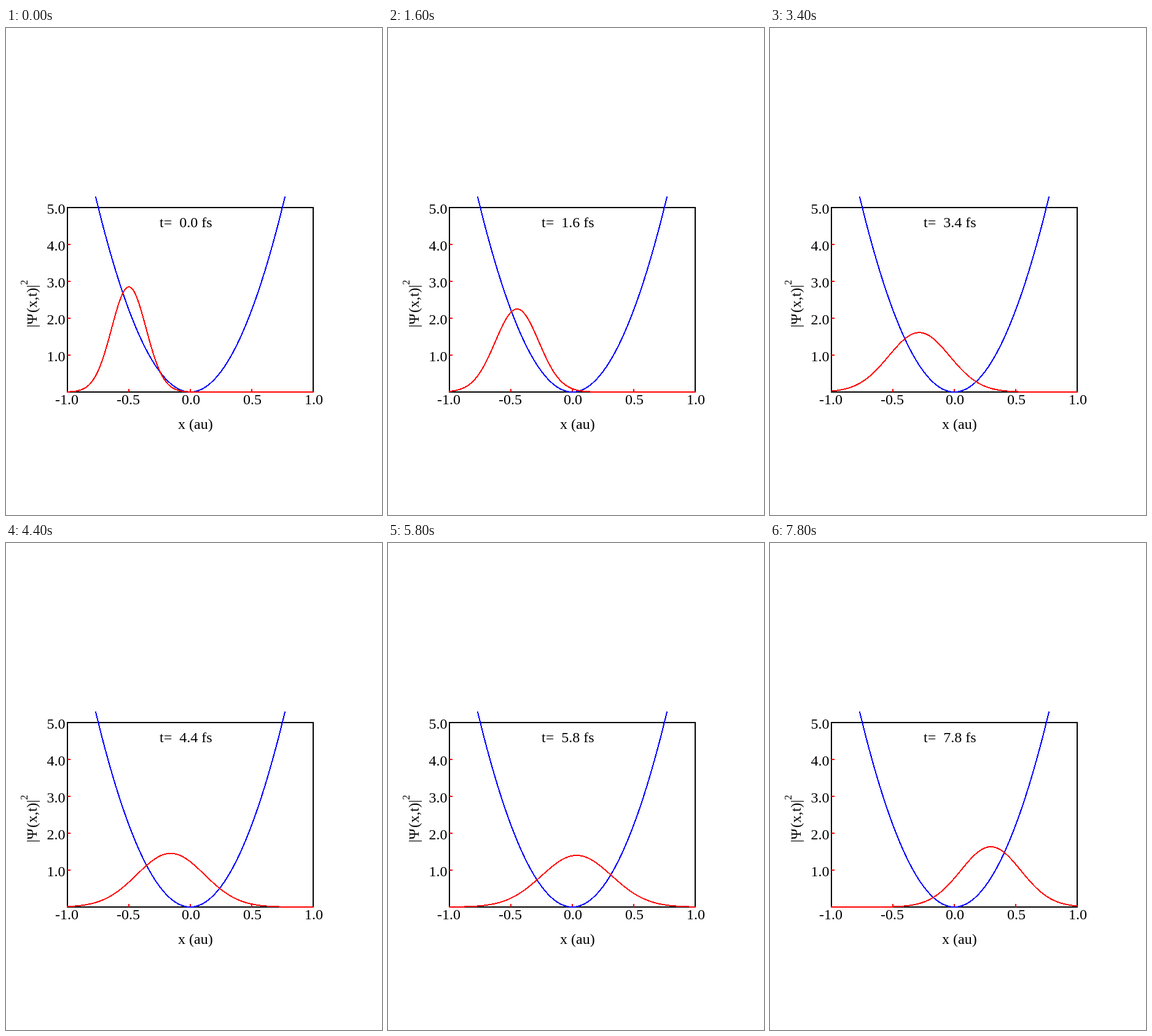
Recreate the animation shown at these times as an HTML page. Size 612 by 792 pixels, loop 8000 ms.

```html
<!DOCTYPE html>
<html lang="en">
<head>
<meta charset="utf-8">
<title>Wave packet in a harmonic well</title>
<style>
  html, body { margin: 0; width: 100%; height: 100%; overflow: hidden; background: #fff; }
  svg { display: block; }
  text { font: 24px "Liberation Serif", serif; white-space: pre; }
  .exponent { font-size: 16px; }
  path, rect { fill: none; stroke-width: 2; stroke-linecap: round; stroke-linejoin: round; shape-rendering: crispEdges; }
</style>
</head>
<body>
<svg width="612" height="792" viewBox="0 0 612 792">
  <rect x="100" y="292" width="400" height="300" stroke="#000"/>
  <path id="ticks" stroke="#f00" style="stroke-linecap: butt"/>
  <path id="well" stroke="#00f"/>
  <path id="packet" stroke="#f00"/>
  <g id="labels"></g>
  <text x="280" y="652">x (au)</text>
  <text id="clock" x="250" y="324"></text>
  <g transform="translate(50 487) rotate(-90)">
    <text>|Ψ<tspan x="23.9">(x,t)|</tspan></text>
    <text class="exponent" x="69.3" y="-15">2</text>
  </g>
</svg>
<script>
const STEP_MS = 200, STEPS = 40;
const OMEGA = 0.283;        // rad per fs
const START = -0.5;         // initial centre
const SIGMA = 0.14;         // initial width
const SPREAD = 2.04;        // width ratio after a quarter period
const STIFFNESS = 8.91;

const byId = id => document.getElementById(id);
const px = x => 300 + 200 * x;
const py = y => 592 - 60 * y;

function curve(fn, limit) {
  const points = [];
  const count = 400;
  for (let i = 0; i <= count; i++) {
    const x = limit * (2 * i / count - 1);
    points.push(px(x).toFixed(2) + ' ' + py(fn(x)).toFixed(2));
  }
  return 'M' + points.join('L');
}

function addLabel(value, x, y) {
  const label = document.createElementNS('http://www.w3.org/2000/svg', 'text');
  label.setAttribute('x', x);
  label.setAttribute('y', y);
  label.textContent = value.toFixed(1);
  byId('labels').append(label);
}

function drawAxes() {
  let ticks = '';
  for (let x = -1; x <= 1; x += 0.5) {
    addLabel(x, px(x) - (x < 0 ? 20 : 14), 612);
    if (Math.abs(x) < 1) ticks += `M${px(x)} 587V592`;
  }
  for (let y = 1; y <= 5; y++) {
    addLabel(y, 66.5, py(y) + 10);
    if (y < 5) ticks += `M100 ${py(y)}H105`;
  }
  byId('ticks').setAttribute('d', ticks);
  byId('well').setAttribute('d', curve(x => STIFFNESS * x * x, 0.77));
}

function density(t) {
  const c = Math.cos(OMEGA * t), s = Math.sin(OMEGA * t);
  const sigma = SIGMA * Math.hypot(c, SPREAD * s);
  const peak = 1 / (Math.sqrt(2 * Math.PI) * sigma);
  return x => peak * Math.exp(-(((x - START * c) / sigma) ** 2) / 2);
}

function render(now) {
  const t = Math.floor(now / STEP_MS) % STEPS * STEP_MS / 1000;
  byId('packet').setAttribute('d', curve(density(t), 1));
  byId('clock').textContent = `t=  ${t.toFixed(1)} fs`;
  requestAnimationFrame(render);
}

drawAxes();
render(0);
</script>
</body>
</html>
```
